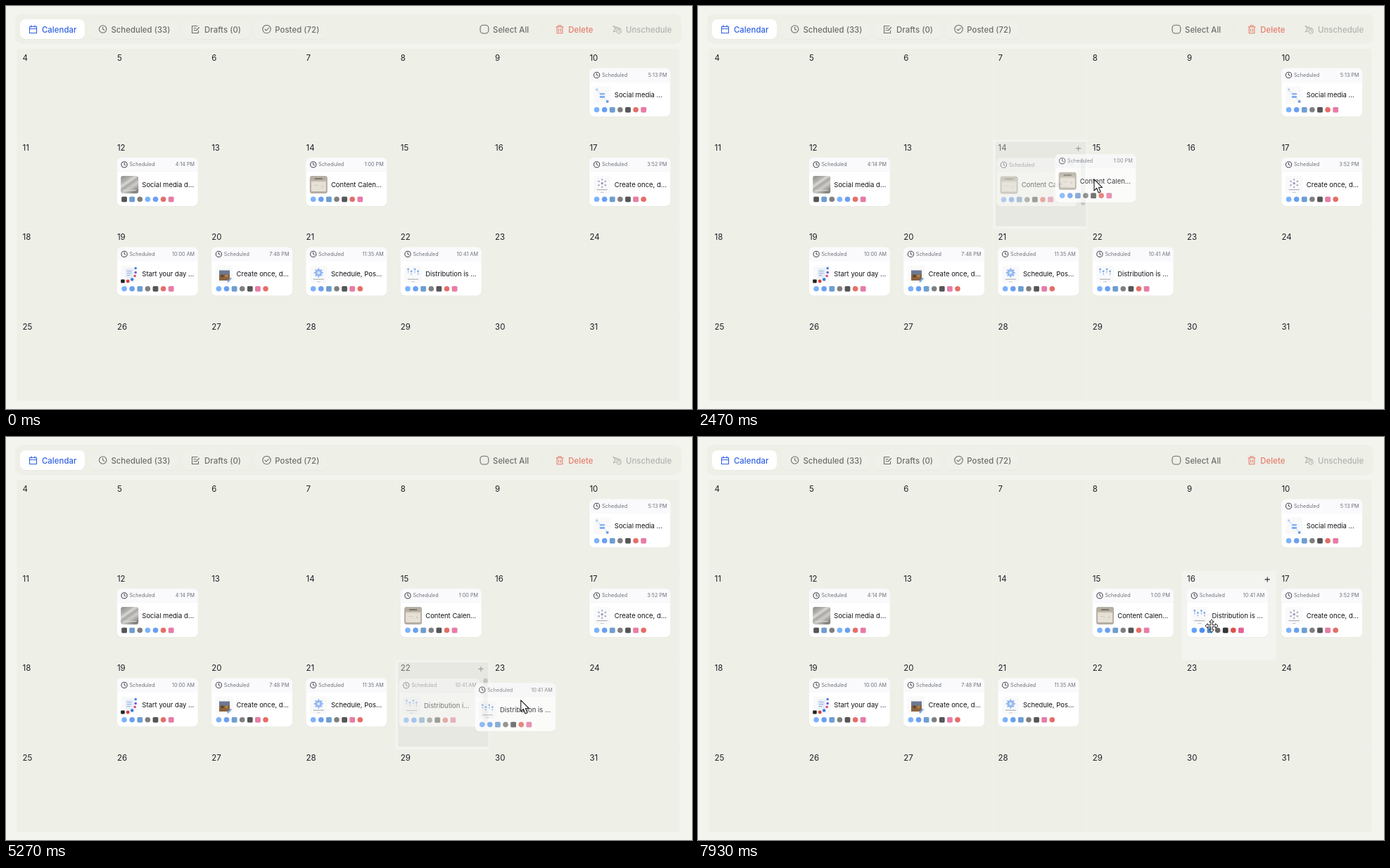
An HTML page that plays this animation: 975x574 px, repeating every 8 s.

```html
<!DOCTYPE html>
<html lang="en">
<head>
<meta charset="utf-8">
<title>Post calendar</title>
<style>
  html, body { margin: 0; width: 100%; height: 100%; overflow: hidden; background: #f3f4ee; }
  svg { display: block; width: 100vw; height: 100vh; font-family: Inter, Roboto, sans-serif; }
  .tab { font-size: 11.3px; font-weight: 500; letter-spacing: .08px; }
  .num { font-size: 11.5px; fill: #1d2127; }
  .small { font-size: 7.2px; fill: #6b7079; }
  .title { font-size: 9.5px; fill: #101318; }
</style>
</head>
<body>
<svg id="stage" viewBox="0 0 975 574" preserveAspectRatio="none"></svg>
<script>
const LOOP = 8000;
const stage = document.getElementById('stage');

const cellX = c => 16 + 134.3 * c;
const cellY = r => 63 + 127.5 * r;
const cellOf = day => ({ c: (day - 4) % 7, r: Math.floor((day - 4) / 7) });
const cardPos = day => {
  const { c, r } = cellOf(day);
  return { x: cellX(c) + 7.6, y: cellY(r) + 25.8 };
};

// Markup helpers
const rect = (x, y, w, h, fill, rx = 0, more = '') =>
  `<rect x="${x}" y="${y}" width="${w}" height="${h}" rx="${rx}" fill="${fill}" ${more}/>`;
const dot = (x, y, r, fill, more = '') =>
  `<circle cx="${x}" cy="${y}" r="${r}" fill="${fill}" ${more}/>`;
const line = (d, color, width = 1) =>
  `<path d="${d}" fill="none" stroke="${color}" stroke-width="${width}" stroke-linecap="round" stroke-linejoin="round"/>`;
const text = (x, y, cls, str, more = '') =>
  `<text x="${x}" y="${y}" class="${cls}" ${more}>${str}</text>`;
const clock = (x, y, r, color, width) =>
  dot(x, y, r, 'none', `stroke="${color}" stroke-width="${width}"`) +
  line(`M${x} ${y - r * .55}V${y}L${x + r * .42} ${y + r * .25}`, color, width);

// Channel badges: colour and shape
const BADGES = {
  b: ['#5b9ffb', 0], f: ['#4688ee', 0], l: ['#4a86c6', 1], t: ['#606060', 0],
  x: ['#2c2c2c', 1], p: ['#de4a42', 0], i: ['#e25c90', 1]
};
const badges = order => [...order].map((key, i) => {
  const [color, square] = BADGES[key], x = 10.2 + 11.1 * i;
  return square ? rect(x - 3.9, 55.1, 7.8, 7.8, color, 1.6) : dot(x, 59, 3.8, color);
}).join('');

// Thumbnails, 25 by 25
const paper = rect(0, 0, 25, 25, '#fafafb', 3) +
  line('M6 1V24M12.5 1V24M19 1V24M1 6H24M1 12.5H24M1 19H24', '#f2f3f5', .5);
const caption = rect(5, 19.2, 15, 1, '#a3a6ac') + rect(10, 23, 5, .8, '#b9bcc2');
const ring = (n, r, draw) => Array.from({ length: n }, (_, i) => {
  const a = i / n * Math.PI * 2 - Math.PI / 2;
  return draw(12.5 + r * Math.cos(a), 10.5 + r * Math.sin(a));
}).join('');
const THUMBS = {
  flow: paper + rect(9, 9.6, 7.5, 2.4, '#86b4f3', 1.2) + rect(9, 13.8, 7.5, 2.4, '#6ba2ef', 1.2) +
    dot(5, 4.5, 1.7, '#b5cff4') + dot(20, 21.5, 2, '#6f9fe8') +
    line('M6 6.5L9 9M16 17L19 20', '#a9c6ee', .7),
  shade: rect(0, 0, 25, 25, 'url(#shade)', 3) + rect(3, 20, 19, 1, '#dcdad6'),
  board: rect(0, 0, 25, 25, '#b5aea1', 3) + rect(2, 7, 21, 15, '#e6e1d7', 1) +
    rect(7, 3.2, 11, 1.6, '#716a5f') + rect(2, 7, 21, 1.6, '#d3cabb') +
    rect(6, 13, 6, 1, '#cfc9bd') + dot(18, 15, 1.5, '#d4cdbf'),
  hub: paper + ring(6, 5.4, (x, y) => line(`M12.5 10.5L${x} ${y}`, '#d5d8e4', .5) + dot(x, y, 1.2, '#a5a9c3')) +
    dot(12.5, 10.5, 1.5, '#8f96ba') + caption,
  desk: paper + rect(7, 4, 11, 14, '#e6edf8', 1) + line('M9 8H15M9 11H15M9 14H13', '#8aa8d2', .9) +
    dot(21, 4, 1.8, '#4f83dd') + dot(21, 10, 1.8, '#6c5fd1') + dot(20, 15, 1.8, '#d94f78') +
    dot(16, 20, 2.3, '#3a7edb') + dot(10, 22.5, 2.4, '#d6403a') + rect(0, 20, 5.5, 5, '#222', 1),
  scene: paper + rect(5.5, 7, 15, 7, '#6c7894') + rect(5.5, 13, 15, 8.5, '#8a6440') +
    dot(10, 15, 2, '#58442f') + dot(16, 15, 2, '#b28547') + line('M18 23L22 18.5', '#75a7e5', 2.2),
  gear: paper + ring(8, 5.4, (x, y) => dot(x, y, 1.3, '#9bbcf3')) +
    dot(12.5, 10.5, 4.8, '#8fb4f3') + dot(12.5, 10.5, 2.3, '#d6e5fc') + caption,
  drops: paper + [[5.5, 5.5], [10, 8.5], [15, 5.5], [19.5, 8.5]].map(([x, y]) =>
    dot(x, y, 1.4, '#7aa9eb') + line(`M${x} ${y + 3}V${y + 4.6}`, '#9cc0f1', 1.4)).join('') + caption
};

const card = ({ time, title, thumb, order }) =>
  rect(0, .7, 114.8, 68.8, '#dcddd6', 6.5, 'opacity=".45"') +
  rect(0, 0, 114.8, 68.6, '#fff', 6.5) +
  '<path d="M0 19V6.5A6.5 6.5 0 0 1 6.5 0H108.3A6.5 6.5 0 0 1 114.8 6.5V19Z" fill="#fafafc"/>' +
  rect(0, 19, 114.8, .6, '#f1f2f4') +
  clock(10.2, 9.6, 4.1, '#33373d', 1) +
  text(17.6, 12.1, 'small', 'Scheduled') +
  text(110.2, 12.1, 'small', time, 'text-anchor="end"') +
  `<g transform="translate(5.3 25.7)">${THUMBS[thumb]}</g>` +
  text(35.4, 41.6, 'title', title) +
  `<g class="badges" opacity=".8">${badges(order)}</g>`;

const post = (day, time, title, thumb, order) => ({ day, time, title, thumb, order });
const posts = [
  post(10, '5:13 PM', 'Social media ...', 'flow', 'bfltxpi'),
  post(12, '4:14 PM', 'Social media d...', 'shade', 'xltbfpi'),
  post(17, '3:52 PM', 'Create once, d...', 'hub', 'bfltxip'),
  post(19, '10:00 AM', 'Start your day ...', 'desk', 'bfltxpi'),
  post(20, '7:48 PM', 'Create once, d...', 'scene', 'bfltxip'),
  post(21, '11:35 AM', 'Schedule, Pos...', 'gear', 'bfltxip'),
  post(14, '1:00 PM', 'Content Calen...', 'board', 'bfltxpi'),
  post(22, '10:41 AM', 'Distribution is ...', 'drops', 'bfltxpi')
];
const content = posts[6], distribution = posts[7];
content.narrow = 'Content Cale...';
distribution.narrow = 'Distribution i...';

const drags = [
  { post: content, from: 14, to: 15, press: 2000, show: 2070, cross: 2450, drop: 2870, place: 3300 },
  { post: distribution, from: 22, to: 23, press: 4700, show: 4780, cross: 5080, drop: 5470, place: 5680 },
  { post: distribution, from: 23, to: 16, press: 6600, show: 6860, cross: 7190, drop: 7730, place: 7900 }
];

// Pointer path: time, x, y, easing into the point
const ease = {
  lin: p => p,
  in: p => p * p,
  out: p => 1 - (1 - p) ** 1.9,
  both: p => p * p * (3 - 2 * p)
};
const path = [
  [500, 978, 576], [1130, 833, 460, 'in'], [1800, 488, 258, 'out'], [1930, 482, 252],
  [2070, 482, 252], [2670, 591, 245], [3800, 591, 245], [3930, 615, 249], [4070, 615, 249],
  [4530, 626, 368], [4760, 626, 368], [5330, 735, 375], [6530, 735, 375], [6730, 739, 371],
  [6840, 740, 372], [7130, 750, 313.5, 'lin'], [7670, 731, 268, 'out'], [7930, 730, 269]
];
function pointer(t) {
  const i = path.findIndex(k => k[0] > t);
  if (i < 0) return { x: path.at(-1)[1], y: path.at(-1)[2] };
  if (!i) return null;
  const [t0, x0, y0] = path[i - 1], [t1, x1, y1, kind = 'both'] = path[i];
  const p = ease[kind]((t - t0) / (t1 - t0));
  return { x: x0 + (x1 - x0) * p, y: y0 + (y1 - y0) * p };
}
const grabPoint = drag => pointer(drag.press + 50);

function toolbar() {
  const grey = '#6d6e6c', red = '#e77c6d', pale = '#b2b3af', blue = '#2f60e6';
  const tab = (x, w, fill) =>
    rect(x, 19.8, w, 28, '#dfe0d8', 8, 'opacity=".5"') + rect(x, 19, w, 28, fill, 8);
  const label = (x, str, color) => text(x, 37.5, 'tab', str, `fill="${color}"`);
  return rect(13, 11, 947, 43, '#eeefe7', 10) +
    tab(20, 92, '#fff') + tab(118, 126, '#eff0e9') + tab(250, 96, '#eff0e9') + tab(351.5, 106, '#eff0e9') +
    line('M33.5 29.5H43.5V38.5H33.5ZM33.5 32.5H43.5M36 27.5V30M41 27.5V30', blue, 1.1) +
    label(51, 'Calendar', blue) +
    clock(137.6, 33, 5.2, grey, 1.1) + label(149.4, 'Scheduled (33)', grey) +
    line('M272 28.5H264.5V38.5H273.5V35M267 31.5H270M267 34.5H269M270 35L274.5 30.5', grey, 1.1) +
    label(282, 'Drafts (0)', grey) +
    dot(370.5, 33, 5.7, 'none', `stroke="${grey}" stroke-width="1.1"`) +
    line('M368 33.2L369.9 35L373.3 31.3', grey, 1.1) + label(382.3, 'Posted (72)', grey) +
    rect(674, 27.2, 11.8, 11.8, 'none', 4.2, `stroke="${grey}" stroke-width="1.1"`) +
    label(692, 'Select All', grey) + rect(761, 25, 1, 17, '#ebece4') +
    line('M782 29.8H792M785 29.5V27.8H789V29.5M783.2 30V38.8H790.8V30M785.6 32.5V36.3M788.4 32.5V36.3', red, 1.1) +
    label(799.3, 'Delete', red) +
    line('M866 32L863 28.5L873.5 32.5M866 32H869M866 32L863.3 37L867 35.5', pale, 1.1) +
    clock(871.2, 36, 3.2, pale, 1) + label(881, 'Unschedule', pale);
}

function grid() {
  let lines = '';
  for (let i = 1; i < 7; i++) lines += `M${cellX(i)} 61V563`;
  for (let i = 1; i < 4; i++) lines += `M16 ${cellY(i)}H957.5`;
  return rect(15.5, 61, 942, 502, '#eeefe7', 3) + line(lines, '#f0f1ea');
}

function numbers() {
  let out = '';
  for (let day = 4; day <= 31; day++) {
    const { c, r } = cellOf(day);
    out += text(cellX(c) + 7.6, cellY(r) + 15.2, 'num', day, `id="n${day}"`);
  }
  return out;
}

const cross = 'M0 -9L3.2 -5.6H1.2V-1.2H5.6V-3.2L9 0L5.6 3.2V1.2H1.2V5.6H3.2L0 9L-3.2 5.6H-1.2V1.2H-5.6V3.2L-9 0L-5.6 -3.2V-1.2H-1.2V-5.6H-3.2Z';
const cursors = {
  arrow: '<path d="M0 0V16.2L3.7 12.7L6.4 19.2L9.2 18L6.5 11.7H11.5Z" fill="#fff" stroke="#222" stroke-width="1.1" stroke-linejoin="round"/>',
  move: `<path d="${cross}" fill="#fff" stroke="#222" stroke-width="1" stroke-linejoin="round"/>`,
  no: dot(0, 0, 5.4, '#f6e9e6', 'stroke="#c92a20" stroke-width="2"') + line('M-3.8 -3.8L3.8 3.8', '#c92a20', 2)
};

stage.innerHTML =
  `<defs><linearGradient id="shade" x2=".7" y2="1">
    <stop offset="0" stop-color="#8f8d8a"/><stop offset=".3" stop-color="#b3b1ad"/>
    <stop offset=".42" stop-color="#dbd9d5"/><stop offset=".54" stop-color="#a9a7a3"/>
    <stop offset=".7" stop-color="#cfcdc9"/><stop offset="1" stop-color="#85837f"/>
  </linearGradient></defs>` +
  rect(0, 0, 975, 574, '#f3f4ee') + toolbar() + grid() +
  rect(0, 0, 133.3, 126.5, '#f3f4ef', 0, 'id="hover"') +
  rect(0, 0, 128.5, 120, '#e7e8e1', 1, 'id="inset"') +
  numbers() +
  `<g id="plus">${line('M-3.2 0H3.2M0 -3.2V3.2', '#2b2e33', 1.1)}</g>` +
  posts.map((p, i) => `<g id="card${i}">${card(p)}</g>`).join('') +
  rect(0, 0, 6, 67.5, '#c3c4bf', 3, 'id="bar"') +
  [content, distribution].map((p, i) => `<g id="ghost${i}" opacity=".8">${card(p)}</g>`).join('') +
  Object.entries(cursors).map(([id, art]) => `<g id="${id}">${art}</g>`).join('');

const get = id => document.getElementById(id);
const show = (node, on) => node.setAttribute('display', on ? 'inline' : 'none');
const place = (node, x, y) => node.setAttribute('transform', `translate(${x} ${y})`);
const hover = get('hover'), inset = get('inset'), plus = get('plus'), bar = get('bar');
posts.forEach((p, i) => {
  p.node = get('card' + i);
  p.label = p.node.querySelector('.title');
  p.badges = p.node.querySelector('.badges');
  p.home = p.day;
  place(p.node, cardPos(p.day).x, cardPos(p.day).y);
});
content.ghost = get('ghost0');
distribution.ghost = get('ghost1');

function overCard({ x, y }) {
  return posts.some(p => {
    const at = cardPos(p.day);
    return x > at.x && x < at.x + 114.8 && y > at.y && y < at.y + 68.6;
  });
}

function update(t) {
  const at = pointer(t);
  const held = drags.find(d => t >= d.show && t < d.drop);
  const busy = drags.find(d => t >= d.press && t < d.place);

  for (const p of [content, distribution]) {
    const last = drags.filter(d => d.post === p && t >= d.place).pop();
    const lifted = !!held && held.post === p;
    p.day = last ? last.to : p.home;
    const pos = cardPos(p.day);
    place(p.node, pos.x - (lifted ? 2.2 : 0), pos.y + (lifted ? .4 : 0));
    p.node.setAttribute('opacity', lifted ? .5 : 1);
    p.label.textContent = lifted ? p.narrow : p.title;
    const age = last ? Math.min(1, (t - last.place) / 150) : 1;
    p.badges.setAttribute('opacity', 1 - .2 * age);
    show(p.ghost, lifted);
    if (lifted) {
      const grab = grabPoint(held);
      place(p.ghost, pos.x + at.x - grab.x, pos.y + at.y - grab.y);
    }
  }

  // The lifted card's cell keeps the hover state until the drop
  let cell = null;
  if (held) cell = cellOf(held.from);
  else if (at && at.x < 957 && at.y < 563)
    cell = { c: Math.floor((at.x - 16) / 134.3), r: Math.floor((at.y - 63) / 127.5) };
  show(hover, cell);
  show(plus, cell);
  show(inset, held);
  show(bar, held);
  if (cell) {
    const x = cellX(cell.c), y = cellY(cell.r);
    place(hover, x + .5, y + .5);
    hover.setAttribute('height', cell.r === 3 ? 117 : 126.5);
    place(plus, x + 121.7, y + 12.4);
    plus.setAttribute('opacity', held ? .4 : 1);
    place(inset, x + 4, y + 3);
    place(bar, x + 125.3, y + 25.8);
  }
  for (const d of drags) get('n' + d.from).setAttribute('opacity', held === d ? .6 : 1);

  let kind = '';
  if (at) {
    if (busy && t < busy.drop) kind = t >= busy.show && t < busy.cross ? 'no' : 'arrow';
    else kind = busy || overCard(at) ? 'move' : 'arrow';
  }
  for (const id in cursors) {
    show(get(id), id === kind);
    if (id === kind) place(get(id), at.x, at.y);
  }
}

const start = performance.now();
function frame() {
  update((performance.now() - start) % LOOP);
  requestAnimationFrame(frame);
}
frame();
</script>
</body>
</html>
```
